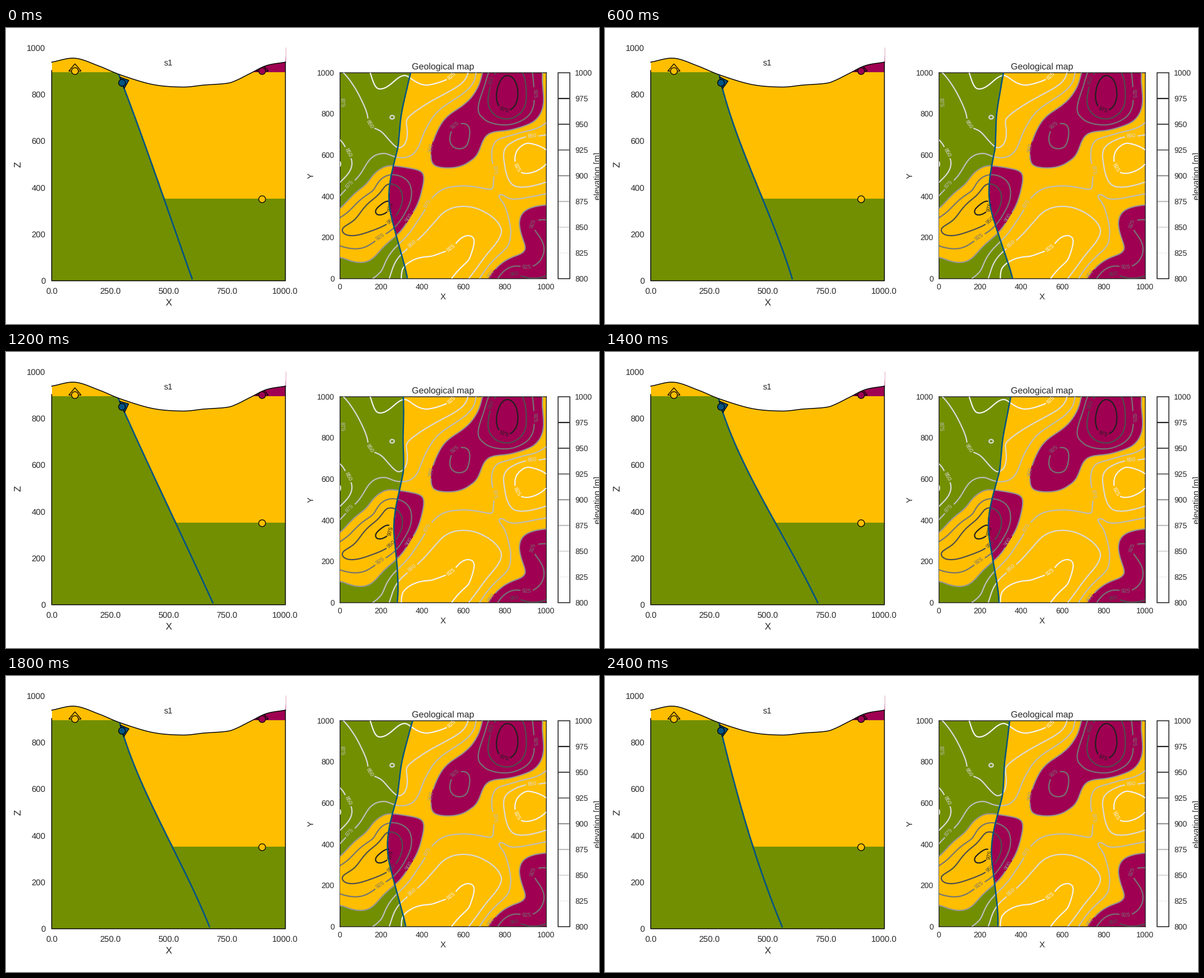
These frames come from a looping animation (1058 px wide and 529 px high, 2600 ms). A matplotlib script:

```python
import matplotlib.pyplot as plt
import numpy as np
from matplotlib.animation import FuncAnimation
from matplotlib.patches import Circle, Polygon, Rectangle
from matplotlib.path import Path

W, H, DPI = 1058, 529, 72          # at 72 dpi one point is one pixel
STEPS, STEP_MS = 13, 200
BLUE, MAROON, YELLOW, GREEN = "#015482", "#9f0052", "#ffbe00", "#728f02"
INK = "#262626"
LEVELS = list(range(825, 1000, 25))
GREYS = ["#f4f4f4", "#dadada", "#bebebe", "#959595", "#747474", "#4e4e4e", "#202020"]

plt.rcParams.update({"font.family": "Liberation Sans", "text.hinting": "no_hinting",
                     "text.hinting_factor": 1})
fig = plt.figure(figsize=(W / DPI, H / DPI), dpi=DPI, facecolor="white")
ax = fig.add_axes([0, 0, 1, 1])
ax.set(xlim=(0, W), ylim=(H, 0))
ax.axis("off")

L, R, T, B = 595.5, 963.5, 79.5, 447.5
geo = fig.add_axes([L / W, 1 - B / H, (R - L) / W, (B - T) / H], facecolor=YELLOW)
geo.set(xlim=(L, R), ylim=(B, T), xticks=[], yticks=[])
for spine in geo.spines.values():
    spine.set(color=INK, linewidth=1.5)


def put(x, y, s, size, ha="center", rot=0):
    ax.text(x, y, s, size=size, ha=ha, va="center_baseline", rotation=rot,
            rotation_mode="anchor", color=INK, zorder=8)


def fill(on, pts, color, z, **kw):
    return on.add_patch(Polygon(pts, facecolor=color, zorder=z, **kw))


def smooth(pts, n=10):
    """Catmull-Rom curve through the points."""
    p = np.asarray(pts, float)
    p = np.vstack([2 * p[0] - p[1], p, 2 * p[-1] - p[-2]])
    t = np.linspace(0, 1, n, endpoint=False)[:, None]
    parts = [b + (c - a) * t / 2 + (2 * a - 5 * b + 4 * c - d) * t**2 / 2
             + (3 * b - a - 3 * c + d) * t**3 / 2
             for a, b, c, d in zip(p, p[1:], p[2:], p[3:])]
    return np.vstack(parts + [p[-2:-1]])


def thin_plate(pts, values):
    """Smooth surface through scattered heights."""
    pts = np.asarray(pts, float) / 100

    def kernel(q):
        r2 = ((q[:, None] - pts) ** 2).sum(-1)
        return r2 * np.log(r2 + 1e-12)

    def plane(q):
        return np.column_stack([np.ones(len(q)), q])

    a = np.block([[kernel(pts), plane(pts)], [plane(pts).T, np.zeros((3, 3))]])
    w = np.linalg.solve(a, np.append(values, [0, 0, 0]))
    return lambda q: np.hstack([kernel(q / 100), plane(q / 100)]) @ w


def triangle(cx, cy, nx, ny):
    return [(cx + 13 * nx, cy + 13 * ny), (cx - 11 * ny, cy + 11 * nx),
            (cx + 11 * ny, cy - 11 * nx)]


# Cross section
topo = smooth([(81.5, 61), (123, 54), (166, 68), (205, 84), (262, 101),
               (315, 105.5), (353, 102), (393, 99), (411, 93.5), (436, 81),
               (465, 67), (498.5, 61)])
ax.add_patch(Rectangle((81.5, 50), 417, 401, color=YELLOW, lw=0, zorder=1))
ax.add_patch(Rectangle((430, 50), 68.5, 29, color=MAROON, lw=0, zorder=1.1))
base = fill(ax, [(0, 0), (1, 0), (0, 1)], GREEN, 2, lw=0)
section_fault, = ax.plot([], [], color=BLUE, lw=2.7, zorder=3)
edge = dict(edgecolor="black", lw=1.3)
fill(ax, triangle(123, 77, 0, -1), YELLOW, 4, **edge)
fill(ax, triangle(457, 77, 0, -1), MAROON, 4, **edge)
dip = fill(ax, triangle(207, 98, 1, 0), BLUE, 4, **edge)
fill(ax, np.vstack([topo, [(500, 20), (80, 20)]]), "white", 5, lw=0)
ax.plot(topo[:, 0], topo[:, 1], color="black", lw=1.5, zorder=6)
for x, y, color in ((123, 77, YELLOW), (457, 77, MAROON),
                    (207, 98, BLUE), (457, 306, YELLOW)):
    ax.add_patch(Circle((x, y), 6.1, facecolor=color, zorder=7, **edge))
ax.plot([498.5, 498.5], [35, 61], color="#e3a6c4", lw=1, zorder=6)
ax.plot([81.5, 81.5, 498.5, 498.5], [76, 451.7, 451.7, 61], color="black",
        lw=1.5, zorder=6, snap=False)

for k in range(6):
    put(70.5, 451.7 - 83.3 * k, str(200 * k), 15.4, "right")
for k in range(5):
    put(81.5 + 104.2 * k, 469, f"{250 * k:.1f}", 15.4)
put(290, 489.5, "X", 16.7)
put(20.5, 244, "Z", 16.7, rot=90)
put(289.5, 61.5, "s1", 14.7)

# Map relief: labelled contour points, then a few more to shape the surface
LABELS = {
    825: [(796, 86), (911, 250), (795, 394)],
    850: [(648, 173), (610, 223), (939, 194), (725, 387)],
    875: [(599, 133), (614, 280), (871, 254), (753, 314)],
    900: [(759, 214), (720, 339), (866, 440)],
    925: [(801, 175), (942, 117), (668, 374), (941, 350), (929, 428)],
    950: [(867, 94), (688, 344), (907, 441)],
    975: [(888, 147), (687, 320)],
}
SHAPE = {
    815: [(940, 240), (775, 440)],
    825: [(663, 108), (713, 85), (750, 102), (597, 242), (930, 206),
          (708, 430), (758, 408), (825, 415)],
    850: [(618, 100), (700, 214), (716, 185), (688, 156), (800, 108),
          (889, 240), (905, 281), (768, 343), (838, 322), (884, 362)],
    875: [(680, 225), (755, 170), (835, 95), (877, 200), (888, 299),
          (671, 432), (783, 287), (900, 372)],
    885: [(830, 265)],
    900: [(595, 323), (668, 252), (742, 290), (672, 393), (600, 411),
          (820, 134), (762, 243), (828, 238), (858, 192), (940, 168),
          (957, 95), (916, 350), (926, 395)],
    925: [(655, 290), (722, 308), (820, 212), (850, 160)],
    945: [(620, 338)],
    950: [(600, 360), (680, 280), (900, 162)],
    975: [(660, 325), (890, 86)],
    990: [(893, 115)],
}
keys = [(p, z) for group in (LABELS, SHAPE) for z, pts in group.items() for p in pts]
relief = thin_plate([p for p, _ in keys], [z for _, z in keys])
gx, gy = np.linspace(L, R, 185), np.linspace(T, B, 185)
X, Y = np.meshgrid(gx, gy)
Z = relief(np.column_stack([X.ravel(), Y.ravel()])).reshape(X.shape)

geo.contourf(X, Y, Z, [900, 2000], colors=[MAROON], zorder=1)
west = fill(geo, [(0, 0), (1, 0), (0, 1)], GREEN, 2, lw=0)
tongue = geo.contourf(X, Y, Z, [900, 2000], colors=[YELLOW], zorder=3)
lines = geo.contour(X, Y, Z, LEVELS, colors=GREYS, linewidths=2.2, zorder=4)
geo.clabel(lines, fontsize=10.4, fmt="%d", inline_spacing=3, zorder=5,
           manual=[p for pts in LABELS.values() for p in pts])
map_fault, = geo.plot([], [], color=BLUE, lw=2.5, zorder=6)

for k in range(6):
    put(L + 73.6 * k, 462, str(200 * k), 13.5)
    put(586, B - 73.6 * k, str(200 * k), 13.5, "right")
put(779.5, 479.5, "X", 14.7)
put(543, 264, "Y", 14.7, rot=90)
put(779.5, 67.5, "Geological map", 15.8)

# Colour bar
ax.add_patch(Rectangle((984.5, T), 21, B - T, fill=False, edgecolor=INK,
                       lw=1.6, zorder=7))
for k in range(9):
    put(1015, B - 46 * k, str(800 + 25 * k), 13.5, "left")
for k, grey in enumerate(GREYS, 1):
    ax.plot([985, 1005], [B - 46 * k] * 2, color=grey, lw=2.2, zorder=6,
            solid_capstyle="butt")
put(1054.5, 264, "elevation [m]", 14.7, rot=90)

# Fault poses for every second step: x in the section, then x on the map
PIVOT = (207, 98)
SECTION_Y = (150, 305, 448)
MAP_Y = (80, 265, 447)
POSES = np.array([
    (226.5, 281.8, 332, 722, 687, 716),
    (231.8, 297, 345, 710, 688, 721),
    (211.8, 265, 323, 712, 686, 733),
    (230.5, 302.5, 369, 709, 698, 698),
    (221.5, 305, 390, 739, 682, 708),
    (228.5, 288, 336, 712, 688, 718),
    (220, 264, 316, 722, 696, 701)])
SHIFT = 0.13                       # sideways pixels per metre of height


def section_curve(xs):
    return np.poly1d(np.polyfit((PIVOT[1], *SECTION_Y), (PIVOT[0], *xs), 3))


def map_curve(xs, y):
    """The trace bends where the inclined fault meets higher ground."""
    column = Z[:, np.searchsorted(gx, 700)]

    def lift(v):
        return SHIFT * (np.interp(v, gy, column) - 850)

    return np.polyval(np.polyfit(MAP_Y, xs + lift(MAP_Y), 2), y) - lift(y)


def jag(y, period):
    return 2.4 * ((y / period) % 1 - 0.5)


def draw(step):
    pose = (POSES[step // 2] + POSES[(step + 1) // 2]) / 2

    curve = section_curve(pose[:3])
    y = np.arange(79, 449)
    section_fault.set_data(curve(y), y)
    y = np.arange(79, 306)
    x = curve(y) + jag(y, 31) + (y - 190) / 110
    base.set_xy(np.vstack([np.column_stack([x, y]), [
        (498.5, 305), (498.5, 451), (81.5, 451), (81.5, 79)]]))
    slope = curve.deriv()(PIVOT[1])
    size = np.hypot(1, slope)
    dip.set_xy(triangle(*PIVOT, 1 / size, -slope / size))

    y = np.arange(78, 450)
    x = map_curve(pose[3:], y)
    map_fault.set_data(x, y)
    side = np.vstack([np.column_stack([x + 1.2 * jag(y, 37), y]),
                      [(590, 450), (590, 78)]])
    west.set_xy(side)
    tongue.set_clip_path(Path(np.vstack([side, side[:1]])), geo.transData)
    return section_fault, base, dip, map_fault, west, tongue


anim = FuncAnimation(fig, draw, frames=STEPS, init_func=lambda: draw(0),
                     interval=STEP_MS, repeat=True, blit=False)
plt.show()
```
